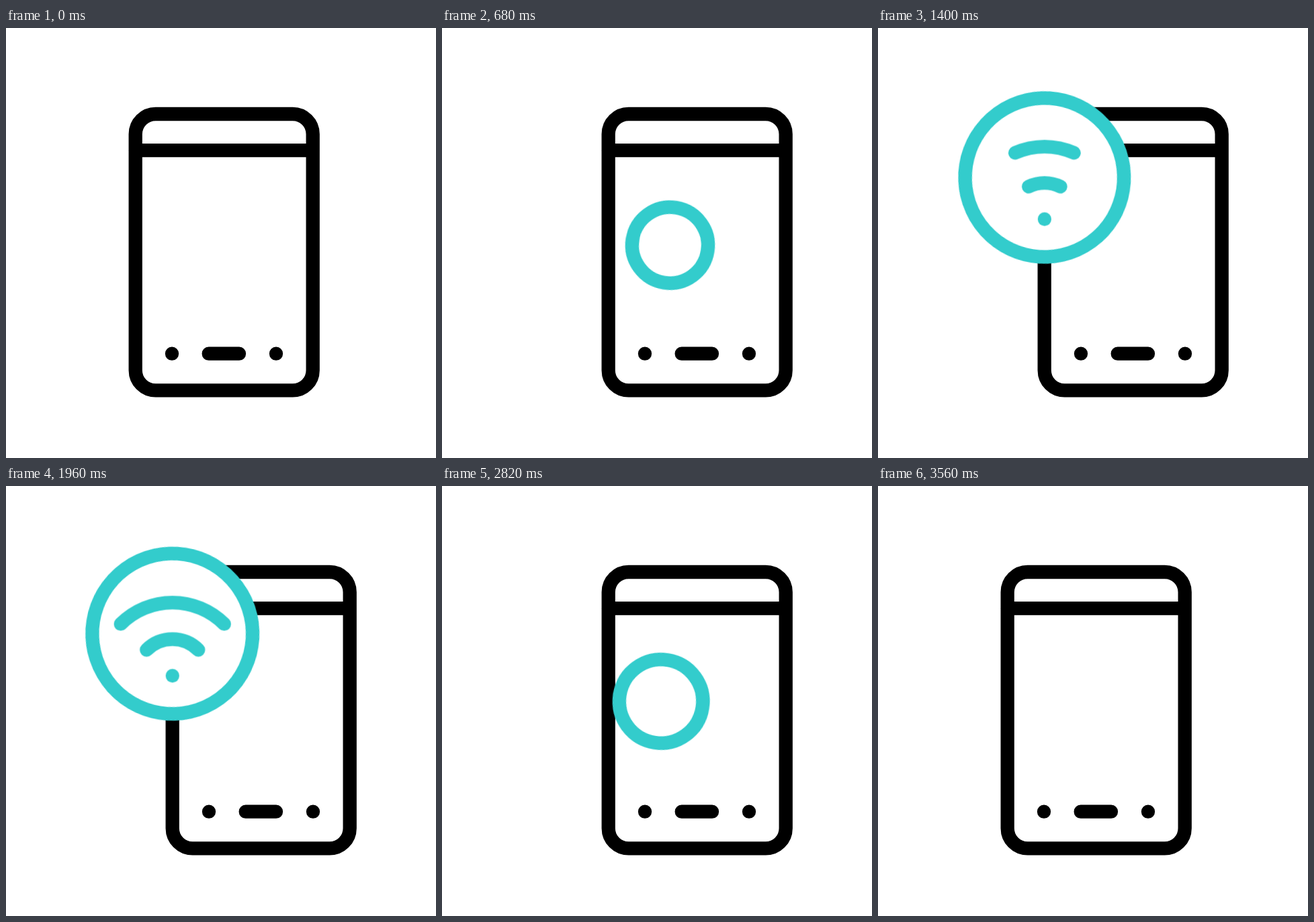
Write an HTML page without scripts that moves like this. It is 640 px wide and 640 px high and loops after 3.6 s.

```html
<!DOCTYPE html>
<html lang="en">
<head>
<meta charset="utf-8">
<title>Phone going online</title>
<style>
  html, body { margin: 0; width: 100%; height: 100%; overflow: hidden; background: #fff; }
  svg { display: block; width: 100vw; height: 100vh; }

  .phone, .badge { fill: none; stroke: #000; stroke-width: 20.3; stroke-linecap: round; }
  .badge { stroke: #3cc; }

  .phone, .badge, .ring, .mast, .arc, .dot {
    animation: 3600ms cubic-bezier(.333, 0, .667, 1) infinite;
  }

  .phone { animation-name: slide; }
  @keyframes slide {
    0% { transform: translateX(0); }
    19.444%, 79.444% { transform: translateX(55px); }
    98.889%, 100% { transform: translateX(0); }
  }

  /* The badge leaves the screen along a curve while it grows. */
  .badge {
    offset-path: path("M363.5 325C290.2 325 250.7 279.7 247.7 219.7");
    offset-rotate: 0deg;
    animation-name: travel;
  }
  @keyframes travel {
    0%, 6.667% { offset-distance: 0%; animation-timing-function: cubic-bezier(.7, 0, .09, 1); }
    45.972%, 52.917% { offset-distance: 100%; animation-timing-function: cubic-bezier(.91, 0, .3, 1); }
    92.222%, 100% { offset-distance: 0%; }
  }

  .ring { --r0: 46.5px; --r1: 119.4px; }
  .near { --r0: 21.2px; --r1: 54.5px; }
  .far { --r0: 42.4px; --r1: 109px; }
  @keyframes grow {
    0%, 6.667% { r: var(--r0); animation-timing-function: cubic-bezier(.7, 0, .09, 1); }
    45.972%, 52.917% { r: var(--r1); animation-timing-function: cubic-bezier(.91, 0, .3, 1); }
    92.222%, 100% { r: var(--r0); }
  }

  .mast { animation-name: drop; }
  @keyframes drop {
    0%, 6.667% { transform: translateY(24.4px); animation-timing-function: cubic-bezier(.7, 0, .09, 1); }
    45.972%, 52.917% { transform: translateY(62.6px); animation-timing-function: cubic-bezier(.91, 0, .3, 1); }
    92.222%, 100% { transform: translateY(24.4px); }
  }

  /* Strokes open from their middle to both sides. */
  .ring { fill: #fff; transform: rotate(99deg); animation-name: grow, draw-ring, show-ring; }
  @keyframes draw-ring {
    0% { stroke-dasharray: 0 360; stroke-dashoffset: 0; }
    19.444%, 79.444% { stroke-dasharray: 360 0; stroke-dashoffset: 180; }
    98.889%, 100% { stroke-dasharray: 0 360; stroke-dashoffset: 0; }
  }
  @keyframes show-ring {
    0% { visibility: hidden; animation-timing-function: step-end; }
    .5% { visibility: visible; animation-timing-function: step-end; }
    98.8%, 100% { visibility: hidden; }
  }

  .arc { transform: rotate(-90deg); }
  .near { animation-name: grow, draw-near; }
  .far { animation-name: grow, draw-far; }
  @keyframes draw-near {
    0%, 27.222% { visibility: hidden; stroke-dasharray: 0 360; stroke-dashoffset: 0; }
    48.333%, 56.5% { visibility: visible; stroke-dasharray: 90 270; stroke-dashoffset: 45; }
    77.611%, 100% { visibility: hidden; stroke-dasharray: 0 360; stroke-dashoffset: 0; }
  }
  @keyframes draw-far {
    0%, 27.917% { visibility: hidden; stroke-dasharray: 0 360; stroke-dashoffset: 0; }
    49.028%, 57.083% { visibility: visible; stroke-dasharray: 90 270; stroke-dashoffset: 45; }
    78.194%, 100% { visibility: hidden; stroke-dasharray: 0 360; stroke-dashoffset: 0; }
  }

  .dot { animation-name: show-dot; }
  @keyframes show-dot {
    0%, 27.222% { visibility: hidden; }
    48.333%, 56.5% { visibility: visible; }
    77.611%, 100% { visibility: hidden; }
  }
</style>
</head>
<body>
<svg viewBox="0 0 640 640">
  <g class="phone">
    <rect x="192.7" y="128" width="264" height="411.4" rx="30"/>
    <path d="M193 182.2H456M247 484.7h.01M301.7 484.7h45.3M402 484.7h.01"/>
  </g>
  <g class="badge">
    <circle class="ring" r="46.5" pathLength="360"/>
    <g class="mast">
      <path class="dot" d="M0 0h.01"/>
      <circle class="arc near" r="54.5" pathLength="360"/>
      <circle class="arc far" r="109" pathLength="360"/>
    </g>
  </g>
</svg>
</body>
</html>
```
